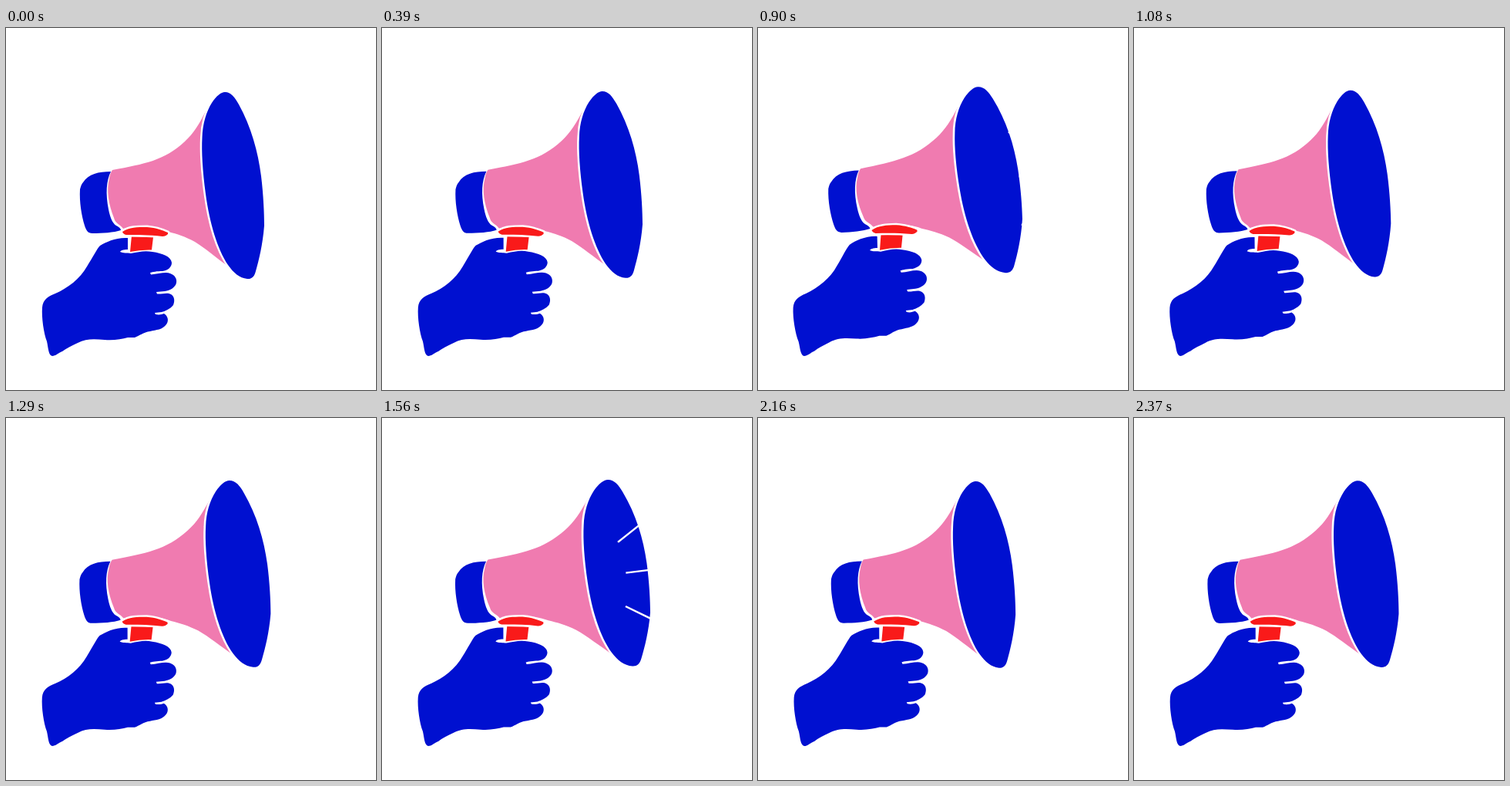
These frames come from a looping animation (480x469 px, 2400 ms). An HTML page:

```html
<!DOCTYPE html>
<html lang="en">
<head>
<meta charset="utf-8">
<title>Megaphone</title>
<style>
  html, body { margin: 0; width: 100%; height: 100%; overflow: hidden; background: #fff; }
  svg { display: block; width: 100vw; height: 100vh; }
  .blue { fill: #0010d0; }
  .pink { fill: #f07bb0; }
  .red { fill: #f91a1a; }
  .edged { stroke: #fff; stroke-width: 5; paint-order: stroke; stroke-linejoin: round; }
  #rays { fill: none; stroke: #fff; stroke-width: 2.4; }
</style>
</head>
<body>
<svg viewBox="0 0 480 469">
  <g id="arm">
    <path class="blue" d="M158 272L158 287C152 287 149 288 148 290C152 292 157 291 162 292C172 290 180 288 190 290
      C203 292 214 296 215 304C215 310 210 314 203 315C196 315 190 316 187 317L188 319.500C197 319 207 315.500 213 318
      C219 320 222 325 221 330C220 336 213 340 206 341L195 342L196 344.500C203 345 209 342 214 345C219 348 219 354 217 359
      C213 364 206 367 202 368L193 369L194 371C199 372 202 371 205 370C211 374 211 380 208 384C203 391 195 391 187 393
      C178 394 173 399 167 401L158 401C150 403 140 405 128 404C115 403 104 402 93 408C85 412 78 415 73 419
      C68 421 64 425 60 425C55 424 55 415 53 406C49 396 46 375 47 362C48 352 54 348 64 344C80 337 96 325 105 309
      C112 298 118 286 122 282C130 277 143 271 158 272Z"/>
    <path class="red" d="M163 269L191 271L189 287.500Q175 287 161 290Z"/>
    <path class="blue" d="M136 186C130 198 129 215 133 235C135 245 138 253 143 256C147 258 149 260 149 262
      C140 265 125 266 112 266C106 266 104 262 102 256C98 243 95 225 96 209C97 205 98 202 100 200C107 189 120 186 136 186Z"/>
    <g id="horn">
      <path class="pink" d="M138 184C180 176 205 172 232 147C243 137 251 124 259 108L280 200L291 311
        C272 297 258 285 245 277C232 270 222 267 211 264C195 257 170 255 152 260C148 254 142 254 140 246
        C133 228 130 210 134 195Q135 188 138 184Z"/>
      <path class="blue edged" d="M284 83C292 83 297 90 302 99C318 128 327 160 331 192C334 217 335 240 335 256
        C333 281 328 301 324 315C322 323 318 325.500 313 325C303 324 295 317 288 307C274 286 264 252 259 215
        C255 185 253.500 160 254.500 142C255 124 260 108 267 97C273 88 279 83 284 83Z"/>
      <g id="rays">
        <path pathLength="1" d="M296 164L322 142.500"/>
        <path pathLength="1" d="M305.500 204L334 200.800"/>
        <path pathLength="1" d="M305 247.400L336 264"/>
      </g>
    </g>
    <path class="red edged" d="M151 264C160 258 170 258 183 258C195 259 203 262 210 265L210 267C208 269 206 270 203 270
      C185 268 170 268 156 268Q152 267 151 264Z"/>
  </g>
</svg>
<script>
const LOOP = 2400, STEP = 30, PULSE = 360, PEAK = 0.07, NECK = 131;
// [time in ms, upward tilt in radians]
const TILT = [[0, 0], [390, .0025], [540, .01], [840, .023], [900, .022], [1080, .01], [1230, .0025],
  [1290, .0025], [1560, .004], [1620, .006], [1920, -.004], [2160, .005], [2280, .006], [2370, .002], [2400, 0]];
const arm = document.getElementById('arm');
const horn = document.getElementById('horn');
const rays = document.getElementById('rays');

const ramp = (v, from, to) => Math.min(1, Math.max(0, (v - from) / (to - from)));
const ease = u => (1 - Math.cos(Math.PI * u)) / 2;

function tiltAt(t) {
  const i = TILT.findIndex(key => key[0] > t);
  const [t0, a] = TILT[i - 1], [t1, b] = TILT[i];
  return a + (b - a) * ease(ramp(t, t0, t1));
}

function draw(t) {
  const phase = t % PULSE;
  const stretch = PEAK * ramp(phase, 0, 125) * (1 - ease(ramp(phase, 125, 325)));
  const lift = -0.2 * stretch;
  arm.setAttribute('transform', `rotate(${-tiltAt(t) * 180 / Math.PI} 60 424)`);
  horn.setAttribute('transform',
    `matrix(${1 + stretch} ${lift} 0 1 ${-NECK * stretch} ${-NECK * lift})`);

  // Rays shoot out from inside the horn and leave over its rim.
  const tail = ramp(phase, 125, 184), head = ramp(phase, 45, 110);
  rays.style.display = head > tail ? '' : 'none';
  rays.style.strokeDasharray = `0 ${tail} ${head - tail} 2`;
}

const start = performance.now();
function tick() {
  const t = (performance.now() - start) % LOOP;
  draw(Math.floor(t / STEP) * STEP);
  requestAnimationFrame(tick);
}
tick();
</script>
</body>
</html>
```
